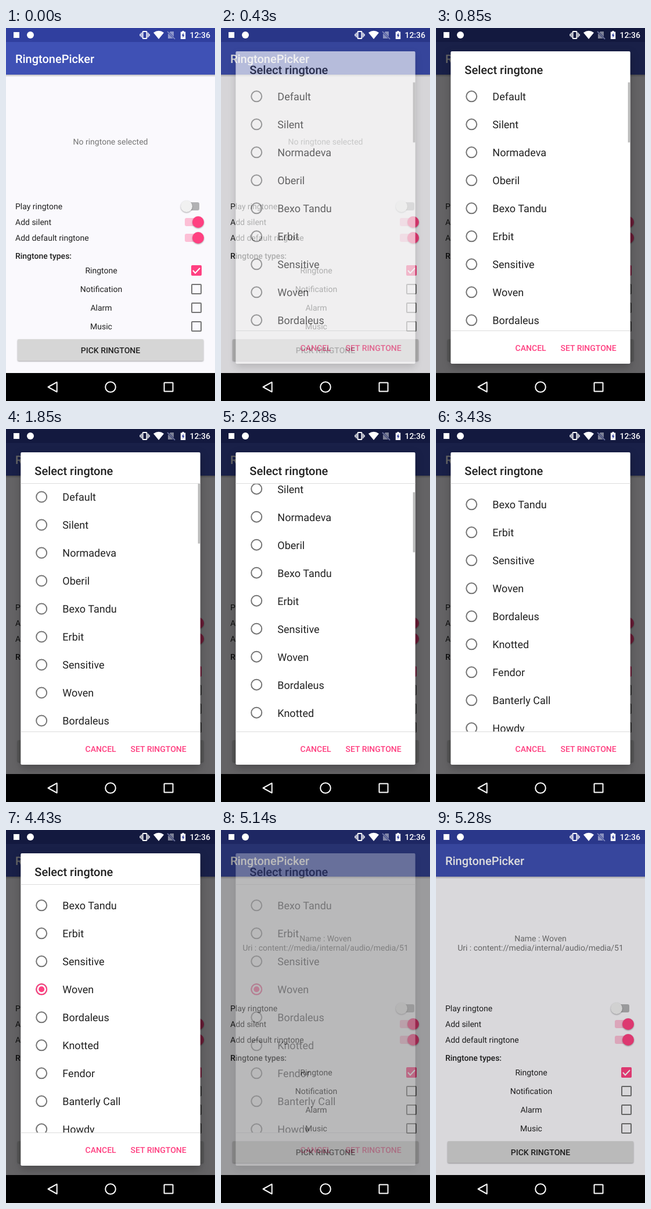
Write an HTML page that moves like this. It is 360x640 px and loops after 5.42 s.

```html
<!DOCTYPE html>
<html lang="en">
<head>
<meta charset="utf-8">
<title>Ringtone picker</title>
<style>
  html, body { margin: 0; width: 100%; height: 100%; overflow: hidden; background: #000; }
  svg { display: block; width: 360px; height: 640px; }
  text { font: 14px Roboto, sans-serif; fill: #212121; text-rendering: geometricPrecision; }
  .medium { font-weight: 500; }
  .title { font-size: 20px; font-weight: 500; }
  .row { font-size: 18px; }
  .mid { text-anchor: middle; }
  .end { text-anchor: end; }
  .muted { fill: #757575; }
  .white { fill: #fff; }
  .accent { fill: #ff4081; }
  .ring { fill: none; stroke: #757575; stroke-width: 2; }
  .line { fill: none; stroke: #fff; stroke-width: 2; }
  .thin { fill: none; stroke: #fff; stroke-width: 1.4; }
  .raised { filter: drop-shadow(0 1px 1.2px rgba(0, 0, 0, .35)); }
  #dialog > .card { filter: drop-shadow(0 5px 7px rgba(0, 0, 0, .25)); }
</style>
</head>
<body>
<svg viewBox="0 0 360 640">
  <defs>
    <clipPath id="listClip"><rect x="25.33" y="93.33" width="309.33" height="425.67"/></clipPath>
    <linearGradient id="barShadow" x2="0" y2="1">
      <stop stop-opacity=".25"/><stop offset="1" stop-opacity="0"/>
    </linearGradient>
  </defs>

  <g id="page">
    <rect width="360" height="592" fill="#faf9fd"/>
    <rect y="80" width="360" height="4" fill="url(#barShadow)"/>
    <rect width="360" height="80" fill="#3f51b5"/>
    <rect width="360" height="24" fill="#303f9f"/>
    <text class="title white" x="16" y="60">RingtonePicker</text>

    <text id="empty" class="mid muted" x="180" y="200">No ringtone selected</text>
    <g id="result">
      <text class="mid muted" x="180" y="191">Name : Woven</text>
      <text class="mid muted" x="180" y="207.3">Uri : content://media/internal/audio/media/51</text>
    </g>

    <g id="options"></g>
    <text class="medium" x="16" y="396">Ringtone types:</text>
    <g id="types"></g>

    <rect class="raised" x="20" y="534" width="320" height="37" rx="2" fill="#d6d6d6"/>
    <rect id="press" x="20" y="534" width="320" height="37" rx="2"/>
    <text class="medium mid" x="180" y="557.7">PICK RINGTONE</text>
  </g>

  <rect id="dim" width="360" height="592"/>

  <g id="status">
    <rect x="13" y="7" width="10" height="10" fill="#fff"/>
    <circle cx="42" cy="12" r="6" fill="#fff"/>
    <rect class="line" x="235.5" y="6" width="7" height="12" rx="1"/>
    <path class="thin" d="M233 8v8M245 8v8M231 10v4M247 10v4"/>
    <path fill="#fff" d="M263 19L254 8Q263 1.5 272 8Z"/>
    <g opacity=".45">
      <path fill="#fff" d="M283 6h6v12h-10v-8z"/>
      <path d="M278 6L291 19" stroke="#303f9f" stroke-width="3"/>
      <path class="thin" d="M278 6L291 19"/>
    </g>
    <path fill="#fff" d="M303.500 5h3v1.500h2.700V19h-8.400V6.500h2.700z"/>
    <path fill="#303f9f" d="M305.700 8l-3 5.300h1.800V17l3-5.300h-1.800z"/>
    <text class="medium white end" x="352" y="17.4">12:36</text>
  </g>

  <g id="dialog">
    <rect class="card" x="25.33" y="40" width="309.33" height="536" rx="2" fill="#fff"/>
    <text class="title" x="49.33" y="79.2">Select ringtone</text>
    <g clip-path="url(#listClip)">
      <g id="list"><rect id="touch" x="25.33" width="309.33" height="48"/></g>
    </g>
    <rect id="thumb" x="330.67" width="4" height="103" fill="#bababa"/>
    <rect id="topLine" x="25.33" y="93" width="309.33" height="1" fill="#dcdcdc"/>
    <rect x="25.33" y="519" width="309.33" height="1" fill="#dcdcdc"/>
    <text class="medium accent end" x="189.67" y="553.5">CANCEL</text>
    <text class="medium accent end" x="310.67" y="553.5">SET RINGTONE</text>
  </g>

  <rect y="592" width="360" height="48"/>
  <path class="line" stroke-linejoin="round" d="M72.500 616L87.700 607.700V624.300Z"/>
  <circle class="line" cx="180" cy="616" r="8.800"/>
  <rect class="line" x="272.500" y="608.500" width="15" height="15" rx=".5"/>
</svg>

<script>
const $ = id => document.getElementById(id);
const add = (id, markup) => $(id).insertAdjacentHTML('beforeend', markup);
const fade = (id, value) => $(id).setAttribute('opacity', value);

const LOOP = 5420, TICKS = 38, SCROLL = 180;
const ROW = 48, LIST_TOP = 93.33, RADIO_X = 61.2, PICKED = 7;
const rowMid = i => LIST_TOP + ROW * (i + .5);
const names = ['Default', 'Silent', 'Normadeva', 'Oberil', 'Bexo Tandu', 'Erbit', 'Sensitive',
  'Woven', 'Bordaleus', 'Knotted', 'Fendor', 'Banterly Call', 'Howdy'];

['Play ringtone', 'Add silent', 'Add default ringtone'].forEach((label, i) => {
  const y = 306 + 27 * i, on = i > 0;
  add('options', `<text x="16" y="${y + 5}">${label}</text>
    <rect x="308" y="${y - 7}" width="25" height="14" rx="3" fill="${on ? '#fcbfd6' : '#b2b2b4'}"/>
    <circle class="raised" cx="${on ? 331 : 311}" cy="${y}" r="10" fill="${on ? '#ff4081' : '#f1f1f1'}"/>`);
});

['Ringtone', 'Notification', 'Alarm', 'Music'].forEach((label, i) => {
  const y = 416 + 32 * i;
  add('types', `<text class="mid" x="164" y="${y + 5}">${label}</text>` + (i
    ? `<rect class="ring" x="320" y="${y - 8}" width="16" height="16" rx="1"/>`
    : `<rect class="accent" x="319" y="${y - 9}" width="18" height="18" rx="2"/>
       <path class="line" d="M322 ${y}l4 4.500l8 -8.500"/>`));
});

names.forEach((name, i) => add('list',
  `<circle class="ring" cx="${RADIO_X}" cy="${rowMid(i)}" r="9"/>
   <text class="row" x="97.33" y="${rowMid(i) + 7}">${name}</text>`));

const pickY = rowMid(PICKED);
$('touch').setAttribute('y', pickY - ROW / 2);
add('list', `<g id="picked">
  <circle class="ring" cx="${RADIO_X}" cy="${pickY}" r="9" style="stroke:#ff4081"/>
  <circle id="dot" class="accent" cx="${RADIO_X}" cy="${pickY}" r="5"/></g>`);

// Value of a stepped track: values start at tick `from`, the last one stays.
const track = (tick, from, values, before = 0) =>
  tick < from ? before : values[Math.min(tick - from, values.length - 1)];

// A drag that starts slowly and settles at the end
function scrollAt(tick) {
  const p = Math.min(Math.max((tick - 12) / 7, 0), 1) ** 1.65;
  return SCROLL * p * p * (3 - 2 * p);
}

function draw(now) {
  const tick = Math.floor((now % LOOP + 7) / (LOOP / TICKS)) % TICKS;
  const closing = tick >= 36;
  const offset = scrollAt(tick);
  const dot = track(tick, 26, [.5, 1]);

  fade('press', track(tick, 1, [.06, .1, .06, .03, 0]));
  fade('dim', closing ? track(tick, 36, [.38, .135]) : track(tick, 3, [.145, .36, .53, .6]));
  fade('dialog', closing ? track(tick, 36, [.3, 0]) : track(tick, 3, [.64, .93, 1]));
  fade('empty', closing ? 0 : 1);
  fade('result', closing ? 1 : 0);

  $('list').setAttribute('transform', `translate(0 ${-offset})`);
  $('thumb').setAttribute('y', LIST_TOP + offset * .242);
  fade('thumb', track(tick, 22, [.55, .2, 0], 1));
  fade('topLine', offset > 0 ? 1 : 0);

  fade('touch', track(tick, 25, [.05, .1, .08, .03, 0]));
  fade('picked', dot ? 1 : 0);
  $('dot').setAttribute('r', 5 * dot);
}

const start = performance.now();
function loop() {
  draw(performance.now() - start);
  requestAnimationFrame(loop);
}
loop();
</script>
</body>
</html>
```
